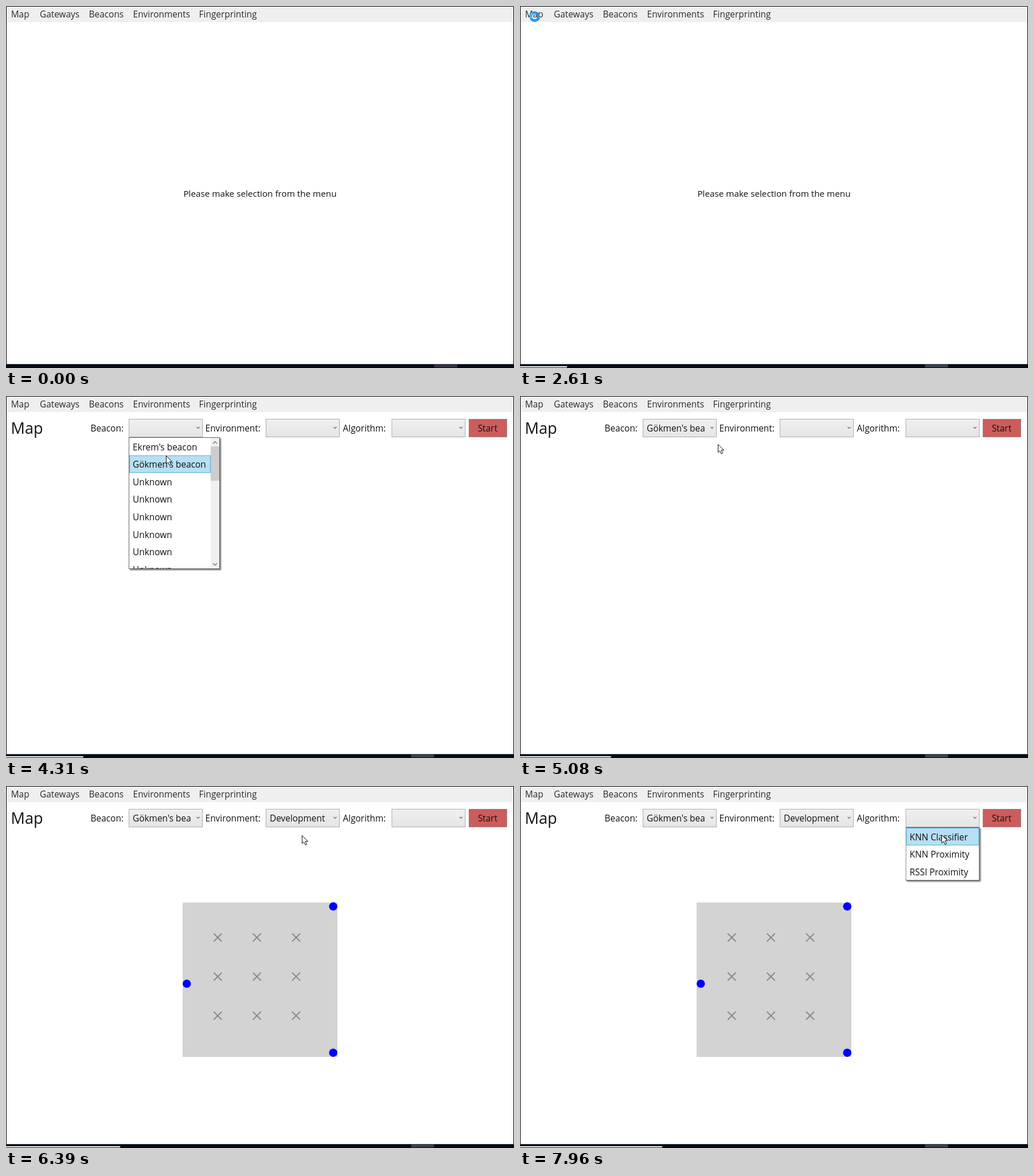
Animation of 886x632 px, one loop 8000 ms. Source, as an HTML page:

```html
<!DOCTYPE html>
<html lang="en">
<head>
<meta charset="utf-8">
<title>Beacon map</title>
<style>
  html, body { margin: 0; width: 100%; height: 100%; overflow: hidden; background: #fff; }
  svg { display: block; }
  text { font: 15.4px "Open Sans", "Noto Sans", sans-serif; fill: #111; white-space: pre; }
  .menu text { fill: #2a2a2a; }
  .title { font-size: 27px; }
  .box { fill: url(#idle); stroke: #acacac; }
  .arrow { fill: none; stroke: #666; stroke-width: 1.2; }
  .hover .box { fill: url(#lit); stroke: #7eb4ea; }
  .hover .arrow { stroke: #000; stroke-width: 1.5; }
  .popup { filter: drop-shadow(2px 2px 1px rgba(0, 0, 0, .55)); }
  .popup .frame { fill: #fff; stroke: #646464; }
  .mark { fill: #b7dff3; stroke: #4aaedb; }
</style>
</head>
<body>
<svg id="stage" width="886" height="632" viewBox="0 0 886 632">
  <defs>
    <linearGradient id="idle" x2="0" y2="1"><stop stop-color="#f0f0f0"/><stop offset="1" stop-color="#e5e5e5"/></linearGradient>
    <linearGradient id="lit" x2="0" y2="1"><stop stop-color="#ecf4fc"/><stop offset="1" stop-color="#dcecfc"/></linearGradient>
  </defs>
  <rect width="886" height="632" fill="#fff"/>
  <g class="menu">
    <rect x="1" y="1" width="884" height="27" fill="#efefef"/>
    <text x="8.7" y="20">Map</text>
    <text x="59" y="20">Gateways</text>
    <text x="144.6" y="20">Beacons</text>
    <text x="221.6" y="20">Environments</text>
    <text x="336.6" y="20">Fingerprinting</text>
  </g>
  <text id="prompt" x="443" y="333" text-anchor="middle" style="font-size:15.25px">Please make selection from the menu</text>
  <g id="page">
    <text class="title" x="8.5" y="66">Map</text>
    <rect x="807.5" y="40.5" width="66" height="31" fill="#cd5c5c" stroke="#a58484"/>
    <text x="840" y="62" text-anchor="middle">Start</text>
    <g id="plan"><rect x="308" y="203.5" width="270" height="269.5" fill="#d3d3d3"/></g>
    <g id="combos"></g>
  </g>
  <path d="M.5 632V.5H885.5V632" fill="none" stroke="#000"/>
  <rect y="625" width="886" height="7" fill="#070a13"/>
  <rect y="625" width="886" height="1" fill="#34414e"/>
  <rect id="task" y="626" width="40" height="5"/>
  <rect id="progress" y="629" height="2" fill="#fff"/>
  <g id="ring" fill="none" stroke-width="4.4">
    <circle cx="25.5" cy="18.5" r="7" stroke="#2f8ff0"/>
    <path d="M19.5 22A7 7 0 0 1 22 12.5" stroke="#3cc0f6"/>
  </g>
  <path id="cursor" d="M.5 .5V14.5L3.7 11.6 6.2 17 8.6 15.9 6.2 10.6H10.5Z" fill="#fff" stroke="#111"/>
</svg>
<script>
const LOOP = 8000, CLICK_MENU = 1250, PAGE_READY = 2900, SLIDE = 200;
const ROW = 30.6, TOP = 72, COMBO_W = 129;
const $ = id => document.getElementById(id);

function add(parent, tag, attrs = {}, text = "") {
  const node = document.createElementNS("http://www.w3.org/2000/svg", tag);
  for (const key in attrs) node.setAttribute(key, attrs[key]);
  node.textContent = text;
  return parent.appendChild(node);
}

// open, pick: times when the list drops down and when an item is chosen
const combos = [
  { label: "Beacon:", labelX: 147.6, x: 214, width: 159, height: 230, scroll: true, marked: 1, open: 4000, pick: 4750,
    items: ["Ekrem's beacon", "Gökmen's beacon", ...Array(6).fill("Unknown")] },
  { label: "Environment:", labelX: 347.6, x: 453, width: 207, height: 32.5, marked: 0, open: 5690, pick: 6230,
    items: ["Development Environment"] },
  { label: "Algorithm:", labelX: 587.5, x: 672.5, width: 129, height: 93, marked: 0, open: 7150, pick: Infinity,
    items: ["KNN Classifier", "KNN Proximity", "RSSI Proximity"] }
];

function buildScrollbar(parent, x, height) {
  add(parent, "rect", { x, y: 1, width: 15, height: height - 2, fill: "#f0f0f0" });
  add(parent, "rect", { x, y: 16, width: 15, height: 60, fill: "#cdcdcd" });
  add(parent, "path", { class: "arrow", d: `M${x + 4} 11l3.5-3.5 3.5 3.5M${x + 4} ${height - 10}l3.5 3.5 3.5-3.5` });
}

function buildCombo(c) {
  add($("page"), "text", { x: c.labelX, y: 62 }, c.label);
  c.node = add($("combos"), "g");
  add(c.node, "rect", { class: "box", x: c.x + .5, y: 40.5, width: COMBO_W - 1, height: 31 });
  add(c.node, "path", { class: "arrow", d: `M${c.x + 118.5} 54l2.5 2.5 2.5-2.5` });
  const field = add(c.node, "svg", { x: c.x, y: 40, width: 108, height: 32 });
  c.value = add(field, "text", { x: 7, y: 22 }, c.items[c.marked]);

  const view = add($("combos"), "svg", { x: c.x, y: TOP, width: c.width + 8, height: c.height + 8 });
  c.popup = add(view, "g", { class: "popup" });
  add(c.popup, "rect", { class: "frame", x: .5, y: .5, width: c.width - 1, height: c.height - 1 });
  const list = add(c.popup, "svg", { width: c.width, height: c.height - 1 });
  const rowWidth = c.width - (c.scroll ? 17 : 2);
  c.mark = add(list, "rect", { class: "mark", x: 1.5, y: 1.5 + c.marked * ROW, width: rowWidth - 1, height: ROW - 1 });
  c.items.forEach((item, i) => add(list, "text", { x: 7, y: 22.5 + i * ROW }, item));
  if (c.scroll) buildScrollbar(list, c.width - 16, c.height);
}
combos.forEach(buildCombo);

for (const y of [264.5, 332.7, 401])
  for (const x of [369.3, 437.6, 506])
    add($("plan"), "path", { d: `M${x - 7} ${y - 7}l14 14m0-14l-14 14`, stroke: "#8a8a8a", "stroke-width": 2 });
for (const [cx, cy] of [[570.7, 210.3], [315.3, 345.2], [570.7, 465.7]])
  add($("plan"), "circle", { cx, cy, r: 7.2, fill: "#00f" });

// pointer route: time, x, y
const route = [
  [70, 728, 634], [1170, 25, 18], [2950, 25, 18], [3600, 258, 56], [3790, 260, 57],
  [4050, 268, 62], [4310, 279, 104], [4800, 279, 106], [5080, 345, 84], [5600, 498, 63],
  [5780, 499, 62], [6130, 512, 85], [6390, 516, 86], [6800, 732, 78], [7000, 734, 62],
  [7300, 734, 62], [7650, 735, 76], [7960, 735, 85]
];

function pointerAt(t) {
  const next = route.findIndex(p => p[0] > t);
  if (next < 0) return route[route.length - 1].slice(1);
  if (next === 0) return route[0].slice(1);
  const [t0, x0, y0] = route[next - 1], [t1, x1, y1] = route[next];
  const p = (t - t0) / (t1 - t0), e = p * p * (3 - 2 * p);
  return [x0 + (x1 - x0) * e, y0 + (y1 - y0) * e];
}

const show = (node, on) => node.style.display = on ? "" : "none";

function drawCombo(c, t, x, y) {
  const inside = x >= c.x && x <= c.x + COMBO_W && y >= 40 && y < TOP;
  c.node.setAttribute("class", inside ? "hover" : "");
  const opened = t >= c.open && t < c.pick;
  show(c.value, t >= c.pick);
  show(c.popup, opened);
  if (!opened) return;
  const rest = 1 - Math.min(1, (t - c.open) / SLIDE);
  c.popup.setAttribute("transform", `translate(0 ${-c.height * rest})`);
  const rowTop = TOP + c.marked * ROW;
  show(c.mark, y >= rowTop && y < rowTop + ROW + 3);
}

function draw(t) {
  const [x, y] = pointerAt(t);
  const busy = t >= CLICK_MENU && t < PAGE_READY;
  show($("prompt"), t < PAGE_READY);
  show($("page"), t >= PAGE_READY);
  show($("plan"), t >= combos[1].pick);
  show($("ring"), busy);
  show($("cursor"), !busy && t >= 70);
  $("cursor").setAttribute("transform", `translate(${Math.round(x)} ${Math.round(y)})`);
  $("task").setAttribute("x", t < CLICK_MENU ? 747 : 706.5);
  $("task").setAttribute("fill", t < CLICK_MENU ? "#363243" : "#3b414b");
  $("progress").setAttribute("width", t < 70 ? 0 : 1 + t * .03103);
  combos.forEach(c => drawCombo(c, t, x, y));
}

const start = performance.now();
function tick() {
  draw((performance.now() - start) % LOOP);
  requestAnimationFrame(tick);
}
tick();
</script>
</body>
</html>
```
